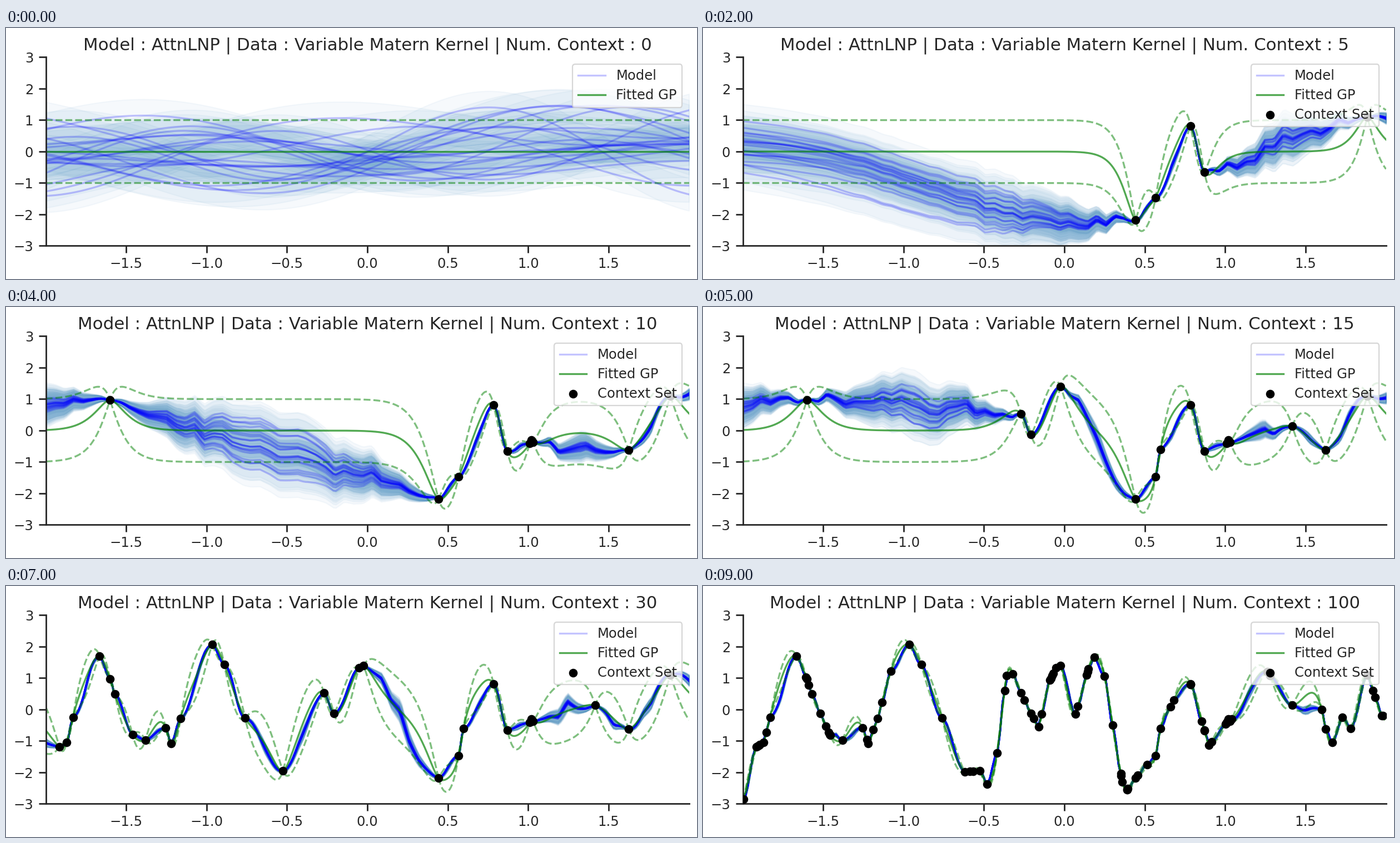
Recreate the animation shown at these times as a matplotlib script. Size 1243 by 451 pixels, loop 10 s.

```python
import numpy as np
import matplotlib.pyplot as plt
from matplotlib.animation import FuncAnimation

W, H, DPI = 1243, 451, 200
INK = "#262626"
X_LIM = (-1.9965, 2.0)
GRID = np.linspace(-2, 2, 256)
GP_GRID = np.linspace(-2, 2, 512)
COUNTS = [0, 2, 5, 7, 10, 15, 20, 30, 50, 100]
N_SAMPLES = 20

plt.rcParams.update({
    "font.family": "DejaVu Sans", "text.color": INK, "axes.edgecolor": INK,
    "xtick.color": INK, "ytick.color": INK, "axes.linewidth": 1.0,
    "lines.linewidth": 1.2, "patch.linewidth": 0.8,
    "xtick.labelsize": 8.8, "ytick.labelsize": 8.8, "legend.fontsize": 8.75,
    "xtick.major.size": 4.8, "ytick.major.size": 4.8,
    "xtick.major.width": 1.0, "ytick.major.width": 1.0,
    "xtick.major.pad": 2.6, "legend.labelspacing": 0.44,
})

# Key points of the hidden signal, in the order they are observed.
OPENING = [(.785, .81), (.871, -.65), (.443, -2.18), (.567, -1.47), (1.884, 1.1),
           (1.01, -.41), (1.625, -.62), (-1.6, .97), (1.02, -.3), (1.03, -.37),
           (-.27, .53), (-.207, -.13), (-.024, 1.4), (.598, -.6), (1.417, .14),
           (-1.914, -1.18), (-1.87, -1.05), (-1.254, -.58), (-1.161, -.28),
           (-.052, 1.33)]
MIDDLE = [(-1.83, -.24), (-1.665, 1.7), (-1.57, .5), (-1.46, -.8), (-1.38, -.97),
          (-1.22, -1.08), (-.965, 2.07), (-.89, 1.44), (-.76, -.27),
          (-.525, -1.95), (-.418, -1.38), (-.32, 1.13), (-.09, .93), (.15, 1.3),
          (.25, 1.07), (.36, -2.3), (.68, .3), (1.665, -1.05), (1.73, -.25),
          (1.78, -.6), (1.975, -.2)]
CLOSING = [(-1.995, -2.85), (-1.08, 1.22), (-.62, -1.98), (-.48, -2.38),
           (-.36, 1.08), (-.16, -.55), (.07, -.15), (.185, 1.66), (.3, -.5),
           (.39, -2.55), (.9, -1.13), (1.26, 1.2), (1.6, 0)]


def fill_up(points, total, rng):
    """Observe the signal again near known points until there are enough."""
    signal = np.array(sorted(OPENING + MIDDLE + CLOSING))
    near = rng.choice(len(points), total - len(points))
    x = np.clip(np.array(points)[near, 0] + rng.normal(0, .025, len(near)), -2, 2)
    return points + list(zip(x, np.interp(x, *signal.T)))


def observe():
    rng = np.random.default_rng(3)
    points = fill_up(OPENING + MIDDLE, 50, rng)
    return np.array(fill_up(points + CLOSING, 100, rng))


POINTS = observe()


def waves(rng, size):
    """Smooth random curves of about unit height, one per row."""
    rates = rng.uniform(.6, 2.6, (size, 3, 1))
    phases = rng.uniform(0, 2 * np.pi, (size, 3, 1))
    return np.sin(rates * GRID + phases).sum(axis=1) / np.sqrt(1.5)


def model_mean(points, rng):
    """Ease between observations and relax to a resting curve outside them."""
    x, y = points[np.argsort(points[:, 0])].T
    i = np.clip(np.searchsorted(x, GRID) - 1, 0, len(x) - 2)
    width = np.maximum(x[i + 1] - x[i], 1e-6)
    t = np.clip((GRID - x[i]) / width, 0, 1)
    bend = np.exp(-width ** 2)
    t = bend * t * t * (3 - 2 * t) + (1 - bend) * t
    inside = y[i] + (y[i + 1] - y[i]) * t

    outside = np.maximum(0, np.maximum(x[0] - GRID, GRID - x[-1]))
    reach = min(.3 * len(x), 1.5)
    rest = .1 * GRID ** 2 - .2
    mean = rest + (inside - rest) * np.exp(-(outside / reach) ** 3)

    gap = np.abs(GRID[:, None] - x).min(axis=1)
    kinks = np.interp(GRID, np.linspace(-2, 2, 70), rng.normal(size=70))
    return mean + 1.2 * gap * np.exp(-3 * gap) * kinks, gap


def model_samples(count):
    """Mean curves and the shared half width of their bands."""
    rng = np.random.default_rng(count)
    if count == 0:
        return .62 * waves(rng, N_SAMPLES), np.full(GRID.shape, .52)
    center, gap = model_mean(POINTS[:count], rng)
    spread = np.minimum(.5 * gap ** 1.5, .38)
    levels = np.linspace(-1, 1, N_SAMPLES)
    levels = 1.9 * np.sign(levels) * np.abs(levels) ** 1.5
    offsets = levels[:, None] + .3 * waves(rng, N_SAMPLES)
    return center + spread * offsets, .02 + np.minimum(1.2 * gap, .52)


def matern(a, b, length):
    s = np.sqrt(3) * np.abs(a[:, None] - b) / length
    return (1 + s) * np.exp(-s)


def length_scale(count):
    return float(np.interp(count, [2, 5, 10, 50, 100], [.01, .09, .115, .115, .17]))


def gp_posterior(count):
    if count == 0:
        return np.zeros(GP_GRID.shape), np.ones(GP_GRID.shape)
    x, y = POINTS[:count].T
    length = length_scale(count)
    cross = matern(GP_GRID, x, length)
    weights = np.linalg.solve(matern(x, x, length) + 1e-3 * np.eye(count), cross.T)
    variance = 1 - np.sum(cross * weights.T, axis=1)
    return weights.T @ y, np.sqrt(np.maximum(variance, 0))


fig = plt.figure(figsize=((W + .01) / DPI, (H + .01) / DPI), dpi=DPI, facecolor="white")
ax = fig.add_axes([72.4 / W, 59.5 / H, 1156.2 / W, 339 / H])


def draw(frame):
    count = COUNTS[frame]
    ax.clear()

    curves, band = model_samples(count)
    for i, curve in enumerate(curves):
        ax.fill_between(GRID, curve - band, curve + band, color="tab:blue", alpha=.04)
        ax.plot(GRID, curve, color="blue", alpha=.23,
                label="Model" if i == 0 else None)

    mean, std = gp_posterior(count)
    ax.plot(GP_GRID, mean, color="green", alpha=.68, label="Fitted GP")
    for bound in (mean - std, mean + std):
        ax.plot(GP_GRID, bound, "--", color="green", alpha=.5)
    if count:
        ax.scatter(*POINTS[:count].T, s=25, linewidths=.6, color="black",
                   zorder=4, label="Context Set")

    ax.set_xlim(*X_LIM)
    ax.set_ylim(-3, 3)
    ax.set_xticks(np.arange(-1.5, 1.6, .5))
    ax.set_yticks(range(-3, 4))
    ax.spines[["top", "right"]].set_visible(False)
    ax.set_title("Model : AttnLNP | Data : Variable Matern Kernel"
                 f" | Num. Context : {count}", fontsize=11.1, pad=4.6)
    ax.legend(loc="upper right")
    return []


anim = FuncAnimation(fig, draw, frames=len(COUNTS), init_func=lambda: [],
                     interval=1000, repeat=True, repeat_delay=0)
plt.show()
```
